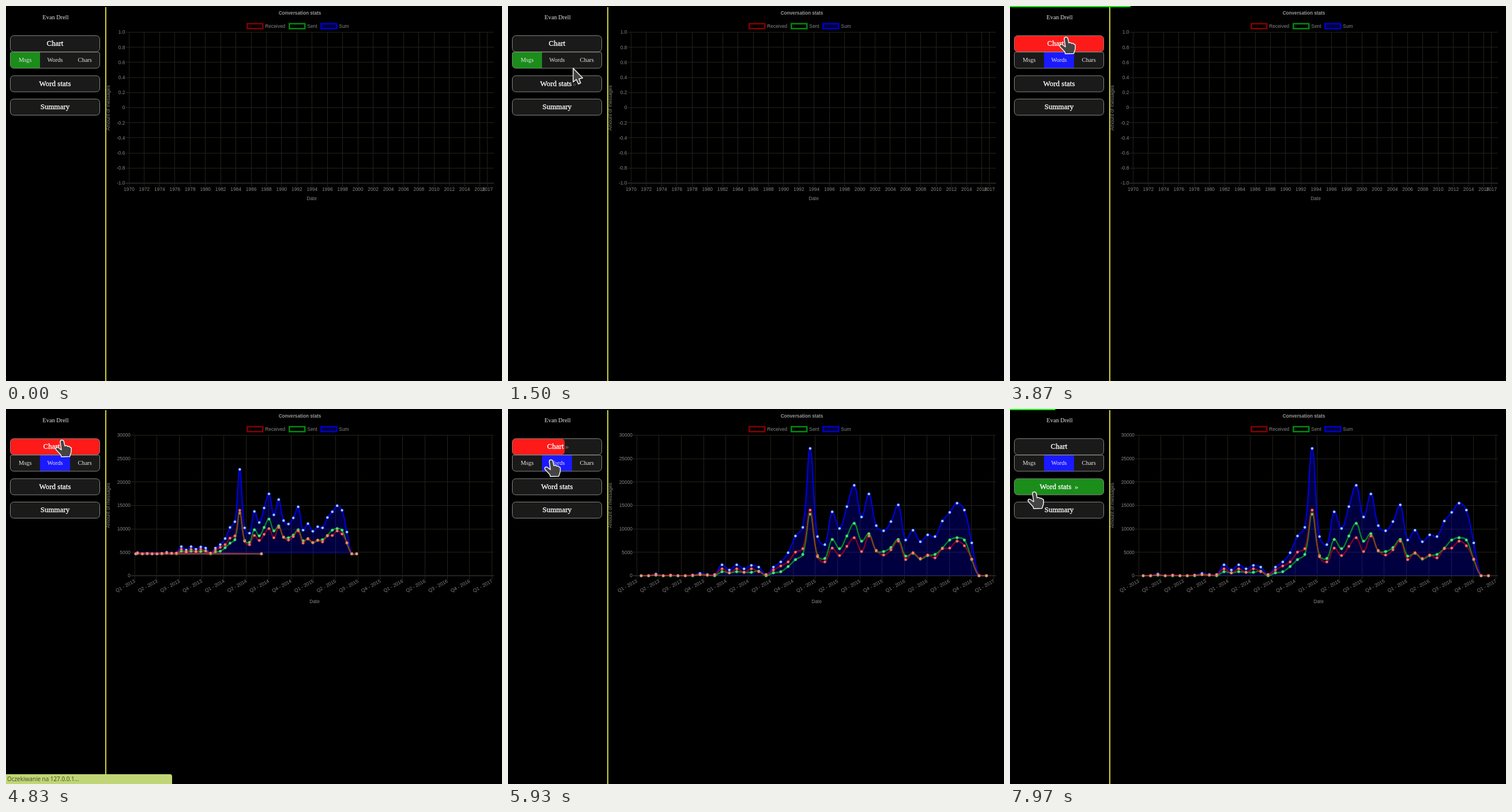
Write an HTML page with a canvas that moves like this. It is 860x651 px and loops after 8 s.

```html
<!DOCTYPE html>
<html lang="en">
<head>
<meta charset="utf-8">
<title>Conversation stats</title>
<style>
  html, body { margin: 0; width: 100%; height: 100%; overflow: hidden; background: #000; }
  canvas { display: block; }
</style>
</head>
<body>
<canvas id="stage" width="860" height="651"></canvas>
<script>
const ctx = document.getElementById('stage').getContext('2d');
const LOOP = 8000, HOVER = 450;
const SERIF = '"Liberation Serif", "Times New Roman", serif';
const SANS = '"Liberation Sans", Arial, sans-serif';

const CHART_START = 4650, CHART_TIME = 770;
const AREA = { left: 223, right: 846, top: 45.5, bottom: 289.5 };

// Monthly heights in pixels above the zero line; received = sum - sent
const SUM = [0, 0, 3, 0, 1, 0, 0, 1, 4, 2, 2, 19, 10, 19, 12, 18, 15, 2, 15, 24, 40, 69, 84, 221,
  68, 54, 111, 82, 120, 157, 102, 142, 87, 78, 94, 123, 62, 79, 59, 71, 68, 95, 110, 126, 114, 57, 0, 0];
const SENT = [0, 0, 1, 0, 0, 0, 0, 0, 2, 1, 0, 7, 5, 7, 6, 6, 8, 0, 5, 7, 16, 28, 37, 107,
  35, 30, 63, 47, 69, 91, 60, 73, 43, 42, 49, 63, 34, 39, 29, 35, 37, 48, 62, 66, 62, 28, 0, 0];
const RECEIVED = SUM.map((v, i) => v - SENT[i]);

const SERIES = [
  { data: SUM, line: 'rgba(0,0,255,.8)', fill: 'rgba(0,0,255,.25)', dot: '#96d8ff' },
  { data: SENT, line: 'rgba(0,255,0,.52)', dot: 'rgba(110,240,165,.8)' },
  { data: RECEIVED, line: 'rgba(255,0,0,.52)', dot: 'rgba(255,150,130,.8)' }
];

const PATH = [
  [370, 866, 172], [900, 330, 168], [1130, 128, 154], [1190, 121, 148], [1300, 115, 130],
  [1360, 114, 120], [1500, 113, 108], [1600, 106, 98], [1900, 80, 80], [1970, 79, 78.5],
  [2170, 79, 78], [2500, 79, 78], [2900, 86, 72], [3300, 97, 54], [5330, 97, 54],
  [6000, 72, 92], [6527, 46, 122], [6730, 42, 137], [7300, 42, 144], [LOOP, 42, 144]
];
const HAND_TIMES = [[1190, 1360], [1520, 6280], [6527, LOOP]];

const BUTTONS = [
  { label: 'Chart', y: 51.5, color: '#ff1a1a', hovers: [[2900, 5790]] },
  { label: 'Word stats', y: 121, color: '#1a8d1a', hovers: [[1190, 1360], [6527, LOOP]] },
  { label: 'Summary', y: 161.5, hovers: [] }
];

const clamp = (v, lo = 0, hi = 1) => Math.min(hi, Math.max(lo, v));
const mix = (a, b, k) => a + (b - a) * k;

// The CSS "ease" curve
function ease(x) {
  x = clamp(x);
  if (x === 0 || x === 1) return x;
  let lo = 0, hi = 1, s = 0.5;
  for (let i = 0; i < 20; i++) {
    s = (lo + hi) / 2;
    const bx = 0.75 * s * (1 - s) + s * s * s;
    if (bx < x) lo = s; else hi = s;
  }
  return 0.3 * s * (1 - s) ** 2 + 3 * s * s * (1 - s) + s ** 3;
}

function text(str, x, y, font, color, align = 'center', angle = 0) {
  ctx.save();
  ctx.translate(x, y);
  ctx.rotate(angle);
  ctx.font = font;
  ctx.fillStyle = color;
  ctx.textAlign = align;
  ctx.textBaseline = 'middle';
  ctx.fillText(str, 0, 0);
  ctx.restore();
}

function box(x, y, w, h, r, fill, stroke) {
  ctx.beginPath();
  ctx.roundRect(x, y, w, h, r);
  if (fill) { ctx.fillStyle = fill; ctx.fill(); }
  if (stroke) { ctx.strokeStyle = stroke; ctx.lineWidth = 1; ctx.stroke(); }
}

function line(x1, y1, x2, y2, color) {
  ctx.strokeStyle = color;
  ctx.lineWidth = 1;
  ctx.beginPath();
  ctx.moveTo(x1, y1);
  ctx.lineTo(x2, y2);
  ctx.stroke();
}

function hoverState(hovers, t) {
  let fill = 0, label = 0;
  for (const [on, off] of hovers) {
    if (t < on) continue;
    const inside = clamp((Math.min(t, off) - on) / HOVER);
    const outside = clamp((t - off) / HOVER);
    fill = Math.max(fill, inside - outside * 1.3);
    label = Math.max(label, ease(inside) * (1 - ease(outside)));
  }
  return { fill, label };
}

function drawButton(b, t) {
  const { fill, label } = hoverState(b.hovers, t);
  const font = '13px ' + SERIF;
  box(7.5, b.y, 155, 28, 6, '#1a1a1a');
  if (fill > 0) box(7.5, b.y, 155 * fill, 28, Math.min(6, 77 * fill), b.color);
  box(7.5, b.y, 155, 28, 6, null, '#85857c');
  const mid = b.y + 14.5;
  text(b.label, 85 - 6 * label, mid, font, '#fff');
  ctx.save();
  ctx.translate(85 - 6 * label, mid);
  ctx.font = font;
  ctx.textAlign = 'center';
  ctx.textBaseline = 'middle';
  ctx.strokeStyle = '#fff';
  ctx.lineWidth = 0.3;
  ctx.strokeText(b.label, 0, 0);
  const half = ctx.measureText(b.label).width / 2;
  ctx.restore();
  ctx.globalAlpha = label;
  text('»', 91 + half, mid, font, '#fff', 'right');
  ctx.globalAlpha = 1;
}

function drawTabs(t) {
  const y = 80, h = 28, corners = [3, 3, 6, 6];
  box(7.5, y, 155, h, corners, '#1a1a1a');
  if (t < 1900) box(7.5, y, 51.5, h, [3, 0, 0, 6], '#1a8d1a');
  const words = clamp((t - 1520) / HOVER);
  if (words) box(59, y, 52 * words, h, 0, '#1a1aff');
  box(7.5, y, 155, h, corners, null, '#85857c');
  ['Msgs', 'Words', 'Chars'].forEach((s, i) =>
    text(s, 33.3 + i * 51.7, 94, '10.5px ' + SERIF, '#e6e6e6'));
}

function drawSidebar(t) {
  ctx.fillStyle = '#d2d23c';
  ctx.fillRect(172, 2, 2, 649);
  text('Evan Drell', 86, 20.5, '10.4px ' + SERIF, '#e6e6e6');
  BUTTONS.forEach(b => drawButton(b, t));
  drawTabs(t);
}

function drawLegend() {
  text('Conversation stats', 509.5, 13, 'bold 8.2px ' + SANS, '#999');
  [['Received', 417, '#850000'], ['Sent', 490, '#008a0c'], ['Sum', 545, '#0000cc']]
    .forEach(([label, x, color], i) => {
      if (i === 2) { ctx.fillStyle = '#000040'; ctx.fillRect(x, 30, 29, 10); }
      ctx.strokeStyle = color;
      ctx.lineWidth = 2.5;
      ctx.strokeRect(x + 1.25, 30.75, 27, 8.5);
      text(label, x + 32.3, 35.5, '8.4px ' + SANS, '#858585', 'left');
    });
}

const GRID = '#22221c', AXIS = '#42423c', TICK = '8.4px ' + SANS, GREY = '#858585';

function drawEmptyGrid() {
  for (let i = 0; i <= 10; i++) {
    const y = 45.5 + i * 26.2, v = 1 - i / 5;
    line(207, Math.floor(y) + 0.5, 846, Math.floor(y) + 0.5, i === 10 ? AXIS : GRID);
    text(i === 5 ? '0' : v.toFixed(1), 206.5, y + 0.5, TICK, GREY, 'right');
  }
  for (let year = 1970; year <= 2017; year += year < 2016 ? 2 : 1) {
    const x = 213.5 + (year - 1970) * 13.22;
    line(Math.floor(x) + 0.5, 45, Math.floor(x) + 0.5, 314, GRID);
    text(year, x, 319, TICK, GREY);
  }
  text('Date', 530, 334.5, TICK, GREY);
  text('Amount of messages', 178, 177, TICK, GREY, 'center', -Math.PI / 2);
}

function drawQuarterGrid() {
  for (let i = 0; i <= 6; i++) {
    const y = 45.5 + i * 40.67;
    line(217, Math.floor(y) + 0.5, 846, Math.floor(y) + 0.5, i === 6 ? AXIS : GRID);
    text(30000 - i * 5000, 216, y + 0.5, TICK, GREY, 'right');
  }
  for (let i = 0; i <= 16; i++) {
    const x = 223 + i * 38.72;
    line(Math.floor(x) + 0.5, 45, Math.floor(x) + 0.5, 296, GRID);
    text(`Q${i % 4 + 1} - ${2013 + Math.floor(i / 4)}`, x + 0.5, 298.5, TICK, GREY, 'right', -0.5);
  }
  text('Date', 535, 334.5, TICK, GREY);
  text('Amount of messages', 178, 167.5, TICK, GREY, 'center', -Math.PI / 2);
}

// The first two points slide from the old axis ends, the rest from the canvas edge
function pointsAt(data, k) {
  return data.map((v, i) => ({
    x: mix([213.5, 834.5][i] || 172, 231 + i * 12.735, k),
    y: mix(176.5, AREA.bottom - v, k)
  }));
}

function controls(p, i) {
  const cur = p[i], a = p[i - 1] || cur, b = p[i + 1] || cur;
  const d1 = Math.hypot(cur.x - a.x, cur.y - a.y), d2 = Math.hypot(b.x - cur.x, b.y - cur.y);
  const at = f => [
    clamp(cur.x + f * (b.x - a.x), AREA.left, AREA.right),
    clamp(cur.y + f * (b.y - a.y), AREA.top, AREA.bottom)
  ];
  return { before: at(-0.4 * d1 / (d1 + d2)), after: at(0.4 * d2 / (d1 + d2)) };
}

function trace(p) {
  const c = p.map((_, i) => controls(p, i));
  ctx.lineTo(p[0].x, p[0].y);
  for (let i = 1; i < p.length; i++)
    ctx.bezierCurveTo(...c[i - 1].after, ...c[i].before, p[i].x, p[i].y);
}

function drawSeries(s, k) {
  const p = pointsAt(s.data, k), zero = mix(176.5, AREA.bottom, k);
  ctx.save();
  ctx.beginPath();
  ctx.rect(AREA.left - 1, AREA.top, AREA.right - AREA.left, AREA.bottom - AREA.top + 1);
  ctx.clip();
  if (s.fill) {
    ctx.beginPath();
    ctx.moveTo(p[0].x, zero);
    trace(p);
    ctx.lineTo(p[p.length - 1].x, zero);
    ctx.fillStyle = s.fill;
    ctx.fill();
  }
  ctx.beginPath();
  trace(p);
  ctx.strokeStyle = s.line;
  ctx.lineWidth = 2.4;
  ctx.lineJoin = 'round';
  ctx.stroke();
  ctx.restore();
  for (const { x, y } of p) {
    if (x < AREA.left) continue;
    ctx.beginPath();
    ctx.arc(x, y, 2.4, 0, 7);
    ctx.fillStyle = s.dot;
    ctx.fill();
    ctx.strokeStyle = s.line;
    ctx.lineWidth = 0.6;
    ctx.stroke();
  }
}

function drawChart(t) {
  drawLegend();
  if (t < CHART_START) return drawEmptyGrid();
  drawQuarterGrid();
  const k = 1 - (1 - clamp((t - CHART_START) / CHART_TIME)) ** 4;
  SERIES.forEach(s => drawSeries(s, k));
}

function drawProgress(t) {
  let w = 0, h = 2;
  if (t >= 7780) w = 215 * ease((t - 7780) / 808);
  else if (t >= 4500 && t < 4740) {
    w = mix(215, 850, ease((t - 4500) / 250));
    h = 2 * (1 - ease((t - 4500) / 300));
  } else if (t >= 3670 && t < 4500) w = 215 * ease((t - 3670) / 250);
  ctx.fillStyle = '#00ff00';
  ctx.fillRect(0, 0, w, h);
}

function drawStatus(t) {
  if (t < 4600 || t > 5000) return;
  box(0, 634, 288, 18, [0, 4, 0, 0], '#c0d576');
  text('Oczekiwanie na 127.0.0.1...', 2, 643, '9.9px "Noto Sans", "Open Sans", sans-serif', '#4a5228', 'left');
}

const ARROW = new Path2D('M0 0V24L5.5 19.5L9 27.5L13 25.5L10 18.5L16.5 17Z');
const HAND = new Path2D('M-3 3Q-3 0 0 0Q3 0 3.5 3L5 10Q8 8.5 10 11Q13 10 14 12.5Q16 12 16.3 15' +
  'L16 21L13.5 28.5L-1 29L-2 25.5L-10 17Q-12 14 -9 12.5Q-7 12 -5 14L-1 17Z');

function drawCursor(t) {
  const i = PATH.findIndex(p => p[0] > t);
  if (i < 1) return;
  const [t1, x1, y1] = PATH[i - 1], [t2, x2, y2] = PATH[i];
  const k = (t - t1) / (t2 - t1);
  const shape = HAND_TIMES.some(([on, off]) => t >= on && t < off) ? HAND : ARROW;
  ctx.save();
  ctx.translate(mix(x1, x2, k), mix(y1, y2, k));
  ctx.fillStyle = '#444';
  ctx.fill(shape);
  ctx.strokeStyle = '#f4f4f4';
  ctx.lineWidth = 1.5;
  ctx.lineJoin = 'round';
  ctx.stroke(shape);
  ctx.restore();
}

function draw(t) {
  ctx.fillStyle = '#000';
  ctx.fillRect(0, 0, 860, 651);
  drawChart(t);
  drawSidebar(t);
  drawProgress(t);
  drawStatus(t);
  drawCursor(t);
}

const began = performance.now();
function tick() {
  const t = (performance.now() - began) % LOOP;
  // thirty pictures a second
  draw(Math.floor((t + 4) * 0.03) / 0.03);
  requestAnimationFrame(tick);
}
tick();
</script>
</body>
</html>
```
